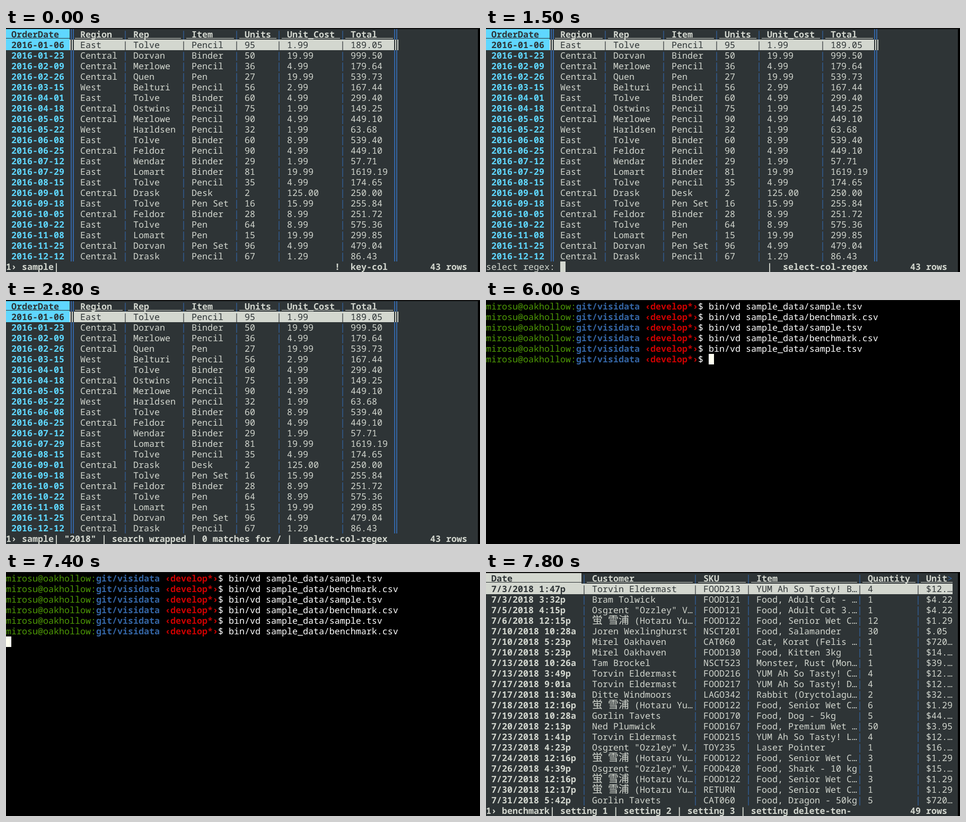
These frames come from a looping animation (894 px wide and 462 px high, 8000 ms). An HTML page:

```html
<!DOCTYPE html>
<html lang="en">
<head>
<meta charset="utf-8">
<title>Terminal session</title>
<style>
  html, body { margin: 0; width: 100%; height: 100%; overflow: hidden; background: #000; }
  svg { display: block; }
  text {
    font: 16.6667px "Noto Sans Mono", "DejaVu Sans Mono", monospace;
    white-space: pre;
    text-rendering: geometricPrecision;
  }
  .bold { font-weight: 700; }
  .wide { font: 20px "Noto Sans CJK JP", "Noto Sans CJK", sans-serif; }
</style>
</head>
<body>
<svg id="stage" width="894" height="462" viewBox="0 0 894 462"></svg>
<script>
const LOOP = 8000;
const CELL = 10, LINE = 20, TOP = 2, BASELINE = 16, UNDERLINE = 17;
const DARK = '#2e3436', LIGHT = '#d3d7cf', BLUE = '#3465a4', CYAN = '#5fd7ff';
const GREEN = '#4e9a06', RED = '#cc0000', WHITE = '#ffffff', CURSOR = '#fffff0';

const stage = document.getElementById('stage');

function add(tag, attrs, content = '') {
  const node = document.createElementNS('http://www.w3.org/2000/svg', tag);
  for (const key in attrs) node.setAttribute(key, attrs[key]);
  node.textContent = content;
  stage.append(node);
}

function rect(x, y, width, height, fill) {
  add('rect', { x, y, width, height, fill });
}

// Columns and rows are counted in terminal cells.
function block(col, row, cols, fill) {
  rect(col * CELL, TOP + row * LINE, cols * CELL, LINE, fill);
}

function put(col, row, text, fill, bold = false) {
  for (const run of text.split(/([一-龯]+)/)) {
    if (!run) continue;
    const wide = /[一-龯]/.test(run);
    add('text', {
      x: col * CELL, y: TOP + row * LINE + BASELINE, fill,
      class: wide ? 'wide' : bold ? 'bold' : ''
    }, run);
    col += run.length * (wide ? 2 : 1);
  }
}

const orders = {
  starts: [0, 13, 23, 34, 44, 52, 64],
  end: 73,
  keyed: true,
  accent: CYAN,
  head: 'OrderDate|Region|Rep|Item|Units|Unit_Cost|Total',
  rows: `01-06|East|Tolve|Pencil|95|1.99
01-23|Central|Dorvan|Binder|50|19.99
02-09|Central|Merlowe|Pencil|36|4.99
02-26|Central|Quen|Pen|27|19.99
03-15|West|Belturi|Pencil|56|2.99
04-01|East|Tolve|Binder|60|4.99
04-18|Central|Ostwins|Pencil|75|1.99
05-05|Central|Merlowe|Pencil|90|4.99
05-22|West|Harldsen|Pencil|32|1.99
06-08|East|Tolve|Binder|60|8.99
06-25|Central|Feldor|Pencil|90|4.99
07-12|East|Wendar|Binder|29|1.99
07-29|East|Lomart|Binder|81|19.99
08-15|East|Tolve|Pencil|35|4.99
09-01|Central|Drask|Desk|2|125.00
09-18|East|Tolve|Pen Set|16|15.99
10-05|Central|Feldor|Binder|28|8.99
10-22|East|Tolve|Pen|64|8.99
11-08|East|Lomart|Pen|15|19.99
11-25|Central|Dorvan|Pen Set|96|4.99
12-12|Central|Drask|Pencil|67|1.29`.split('\n').map(line => {
    const cells = line.split('|');
    return ['2016-' + cells[0], ...cells.slice(1), (cells[4] * cells[5]).toFixed(2)];
  })
};

const sales = {
  starts: [0, 19, 40, 50, 71, 82],
  end: 88,
  keyed: false,
  accent: LIGHT,
  head: 'Date|Customer|SKU|Item|Quantity|Unit',
  rows: `3/2018 1:47p|Torvin Eldermast|FOOD213|YUM Ah So Tasty! B…|4|$12.…
3/2018 3:32p|Bram Tolwick|FOOD121|Food, Adult Cat - …|1|$4.22
5/2018 4:15p|Osgrent "Ozzley" V…|FOOD121|Food, Adult Cat 3.…|1|$4.22
6/2018 12:15p|蛍 雪浦 (Hotaru Yu…|FOOD122|Food, Senior Wet C…|12|$1.29
10/2018 10:28a|Joren Wexlinghurst|NSCT201|Food, Salamander|30|$.05
10/2018 5:23p|Mirel Oakhaven|CAT060|Cat, Korat (Felis …|1|$720…
10/2018 5:23p|Mirel Oakhaven|FOOD130|Food, Kitten 3kg|1|$14.…
13/2018 10:26a|Tam Brockel|NSCT523|Monster, Rust (Mon…|1|$39.…
13/2018 3:49p|Torvin Eldermast|FOOD216|YUM Ah So Tasty! C…|4|$12.…
17/2018 9:01a|Torvin Eldermast|FOOD217|YUM Ah So Tasty! D…|4|$12.…
17/2018 11:30a|Ditte Windmoors|LAGO342|Rabbit (Oryctolagu…|2|$32.…
18/2018 12:16p|蛍 雪浦 (Hotaru Yu…|FOOD122|Food, Senior Wet C…|6|$1.29
19/2018 10:28a|Gorlin Tavets|FOOD170|Food, Dog - 5kg|5|$44.…
20/2018 2:13p|Ned Plumwick|FOOD167|Food, Premium Wet …|50|$3.95
23/2018 1:41p|Torvin Eldermast|FOOD215|YUM Ah So Tasty! L…|4|$12.…
23/2018 4:23p|Osgrent "Ozzley" V…|TOY235|Laser Pointer|1|$16.…
24/2018 12:16p|蛍 雪浦 (Hotaru Yu…|FOOD122|Food, Senior Wet C…|3|$1.29
26/2018 4:39p|Osgrent "Ozzley" V…|FOOD420|Food, Shark - 10 kg|1|$15.…
27/2018 12:16p|蛍 雪浦 (Hotaru Yu…|FOOD122|Food, Senior Wet C…|3|$1.29
30/2018 12:17p|蛍 雪浦 (Hotaru Yu…|RETURN|Food, Senior Wet C…|1|$1.29
31/2018 5:42p|Gorlin Tavets|CAT060|Food, Dragon - 50kg|5|$720…`
    .split('\n').map(line => ('7/' + line).split('|'))
};

function keyRule(col, row, fill) {
  for (const dx of [2, 6]) rect(col * CELL + dx, TOP + row * LINE, 2, LINE, fill);
}

function drawSheet({ starts, end, keyed, accent, head, rows }) {
  rect(0, TOP, 890, 460, DARK);
  const firstEnd = starts[1] - 1;
  const lastCol = end + (keyed ? 1 : 0);
  block(0, 0, firstEnd, accent);
  block(0, 1, lastCol, LIGHT);
  block(0, 1, firstEnd, accent);

  [head.split('|'), ...rows].forEach((cells, row) => {
    const header = row === 0, active = row === 1;
    const rule = active ? DARK : BLUE;
    cells.forEach((text, i) => {
      const dark = active || (header && i === 0);
      const fill = dark ? DARK : i === 0 ? accent : LIGHT;
      put(starts[i] + 1, row, text, fill, header || i === 0);
      if (header) {
        const stop = i + 1 < starts.length ? starts[i + 1] - 1 : end;
        rect(starts[i] * CELL, TOP + UNDERLINE, (stop - starts[i]) * CELL, 1, fill);
      }
      if (i === 0) return;
      if (keyed && i === 1) keyRule(starts[i] - 1, row, rule);
      else put(starts[i] - 1, row, '|', rule);
    });
    if (keyed) keyRule(end, row, rule);
  });
  if (!keyed) put(87, 0, '>', BLUE);
}

const status = (col, text) => put(col, 22, text, LIGHT, true);

function orderSheet() {
  drawSheet(orders);
  status(80, '43 rows');
}

function regexPrompt(typed) {
  orderSheet();
  put(0, 22, 'select regex: ' + typed, LIGHT);
  block(14 + typed.length, 22, 1, LIGHT);
  status(53, '|  select-col-regex');
}

const SAMPLE = 'bin/vd sample_data/sample.tsv';
const BENCHMARK = 'bin/vd sample_data/benchmark.csv';

function shell(command, entered = false) {
  [SAMPLE, BENCHMARK, SAMPLE, BENCHMARK, SAMPLE, command].forEach((text, row) => {
    put(0, row, 'mirosu@oakhollow:', GREEN);
    put(17, row, 'git/visidata', BLUE, true);
    put(30, row, '‹develop*›', RED, true);
    put(40, row, '$ ' + text, WHITE);
  });
  if (entered) block(0, 6, 1, CURSOR);
  else block(42 + command.length, 5, 1, CURSOR);
}

const steps = [
  [0, () => { orderSheet(); status(0, '1› sample|'); status(62, '!  key-col'); }],
  [1500, () => regexPrompt('')],
  [2100, () => regexPrompt('2018')],
  [2800, () => {
    orderSheet();
    status(0, '1› sample| "2018" | search wrapped | 0 matches for / |  select-col-regex');
  }],
  [6000, () => shell('')],
  [6600, () => shell(SAMPLE)],
  [6900, () => shell(BENCHMARK)],
  [7400, () => shell(BENCHMARK, true)],
  [7800, () => {
    drawSheet(sales);
    status(0, '1› benchmark| setting 1 | setting 2 | setting 3 | setting delete-ten-');
    status(80, '49 rows');
  }]
];

let shown = null;

function tick() {
  const time = performance.now() % LOOP;
  const step = steps.findLast(([start]) => start <= time);
  if (step !== shown) {
    shown = step;
    stage.replaceChildren();
    rect(0, 0, 894, 462, '#000');
    rect(0, 0, 894, 1, '#1c1c1c');
    step[1]();
  }
  requestAnimationFrame(tick);
}
tick();
</script>
</body>
</html>
```
